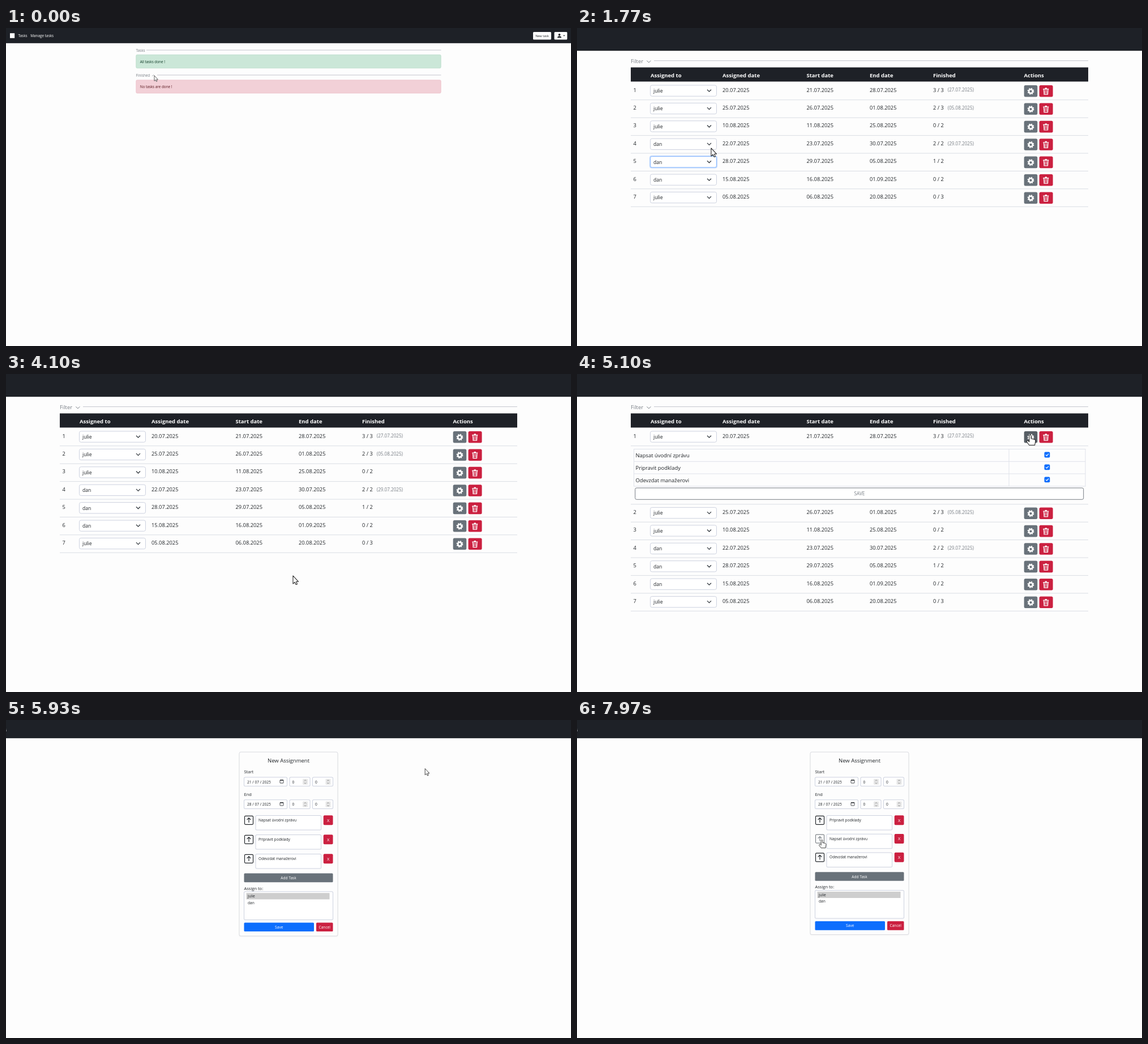
Animation of 998x561 px, one loop 8000 ms. Source, as an HTML page:

```html
<!DOCTYPE html>
<html lang="en">
<head>
<meta charset="utf-8">
<title>Task manager tour</title>
<style>
html, body { margin: 0; width: 100%; height: 100%; overflow: hidden; background: #000; }
svg { display: block; width: 998px; height: 561px; }
text { font-family: "Open Sans", "Noto Sans", sans-serif; white-space: pre; }
</style>
</head>
<body>
<svg viewBox="0 0 998 561">
  <g id="camera">
    <rect width="998" height="561" fill="#fdfdfd"/>
    <g id="page"></g>
    <g id="nav"></g>
    <g id="cursor" stroke="#222" stroke-width=".7" stroke-linejoin="round" fill="#fff">
      <path id="arrow" d="M0 0V9.4L2.1 7.5 3.5 10.4 5 9.8 3.7 6.9H6.4Z"/>
      <path id="hand" d="M-1.1 .9Q0-.6 1.1 .9V4.6L4.9 5.4Q6.5 5.9 6.2 7.6L5.4 12.3H-1.2L-4.1 8.3Q-4 6.5-2.5 7.1L-1.1 8.3Z"/>
    </g>
  </g>
</svg>
<script>
const LOOP = 8000, MID = 499;
const DARK = '#1e2127', INK = '#212529', GREY = '#69727a', RED = '#cb2040', BLUE = '#0d6efd',
  EDGE = '#cdd2df', RULE = '#c3c6cd', MUTED = '#777d84';
const $ = id => document.getElementById(id);

const rect = (x, y, w, h, fill, rx = 0, stroke = 'none', more = '') =>
  `<rect x="${x}" y="${y}" width="${w}" height="${h}" rx="${rx}" fill="${fill}" stroke="${stroke}" ${more}/>`;
const text = (x, y, s, size, fill = INK, more = '') =>
  `<text x="${x}" y="${y}" font-size="${size}" fill="${fill}" ${more}>${s}</text>`;
const centred = (x, y, s, size, fill) => text(x, y, s, size, fill, 'text-anchor="middle"');
const line = (d, stroke = INK, width = 1) =>
  `<path d="${d}" fill="none" stroke="${stroke}" stroke-width="${width}"/>`;
const view = (scale, body) =>
  `<g transform="scale(${1 / scale}) translate(${MID * (scale - 1)})">${body}</g>`;

const people = ['julie', 'dan'];
const chores = ['Napsat úvodní zprávu', 'Pripravit podklady', 'Odevzdat manažerovi'];
const heads = [[130, 'Assigned to'], [257, 'Assigned date'], [405.5, 'Start date'],
  [517, 'End date'], [629, 'Finished'], [789.5, 'Actions']];
// person, assigned, start, end, progress, finish date
const rows = [
  [0, '20.07', '21.07', '28.07', '3 / 3', '27.07'],
  [0, '25.07', '26.07', '01.08', '2 / 3', '05.08'],
  [0, '10.08', '11.08', '25.08', '0 / 2'],
  [1, '22.07', '23.07', '30.07', '2 / 2', '29.07'],
  [1, '28.07', '29.07', '05.08', '1 / 2'],
  [1, '15.08', '16.08', '01.09', '0 / 2'],
  [0, '05.08', '06.08', '20.08', '0 / 3']];

const navBar = () =>
  rect(0, 0, 998, 26.8, DARK) +
  rect(7, 9.2, 8.2, 8.6, '#fff') +
  text(21.5, 16.3, 'Tasks', 6.4, '#fff') +
  text(43.3, 16.3, 'Manage tasks', 6.4, '#fff') +
  rect(931, 7, 32, 13.5, '#fdfdfd', 1.5) +
  centred(947, 16, 'New task', 5.6, INK) +
  rect(968.5, 7, 22.8, 13.5, '#fdfdfd', 1.5) +
  `<g fill="${INK}"><circle cx="977.5" cy="11.8" r="1.9"/>
   <path d="M974 17.2Q974 14.2 977.5 14.2T981 17.2ZM984 12.7H987.6L985.8 14.6Z"/></g>`;

const tasksPage = () =>
  text(229.5, 41.6, 'Tasks', 6.4, MUTED) + line('M248 39H768.5', RULE) +
  rect(229.8, 47.2, 538.4, 23.6, '#cbe7d8', 2, '#a9d3be', 'stroke-width=".6"') +
  text(236.7, 61.8, 'All tasks done !', 6.35, '#0a3622') +
  text(229.5, 85.8, 'Finished', 6.35, MUTED) + line('M258 85L260.5 82.8 263 85', MUTED, .6) +
  line('M267 83H768.5', RULE) +
  rect(229.8, 91.8, 538.4, 23.2, '#f2d0d7', 2, '#e9b6bf', 'stroke-width=".6"') +
  text(236.7, 106.3, 'No tasks are done !', 6.35, '#58151c');

const gear = (x, y) => `<g fill="none" stroke="#fff"><circle cx="${x}" cy="${y}" r="3.4" stroke-width="2.6"/>
  <circle cx="${x}" cy="${y}" r="5" stroke-width="1.8" stroke-dasharray="2.1 1.827"/></g>`;
const bin = (x, y) => line(`M${x - 5} ${y - 4}H${x + 5}M${x - 1.6} ${y - 5.4}H${x + 1.6}`, '#fff', 1.4) +
  line(`M${x - 4} ${y - 3.5}L${x - 3.2} ${y + 5.5}H${x + 3.2}L${x + 4} ${y - 3.5}
    M${x - 1.6} ${y - 2.5}V${y + 4}M${x + 1.6} ${y - 2.5}V${y + 4}`, '#fff', 1.2);

function tableRow([who, assigned, start, end, progress, done], i, y, focus, hover) {
  const date = (x, d) => text(x, y + 112.6, d + '.2025', 9.3);
  return text(99.5, y + 112.6, i + 1, 9.3) +
    (focus ? rect(128, y + 99.5, 120, 22.5, '#c3dafe', 4) : '') +
    rect(129.5, y + 101, 117, 19.3, '#fff', 3, focus ? '#86b7fe' : EDGE) +
    text(135, y + 114, people[who], 8.6) +
    line(`M230 ${y + 108.7}l3.5 3.5 3.5-3.5`, '#343a40', 1.3) +
    date(257, assigned) + date(405.5, start) + date(517, end) +
    text(629, y + 112.6, progress, 9.3) +
    (done ? text(654.8, y + 112.4, `(${done}.2025)`, 8.1, MUTED) : '') +
    rect(789.7, y + 101, 23.6, 20.6, hover ? '#575e65' : GREY, 2.5) + gear(801.5, y + 111.7) +
    rect(816.6, y + 101, 24, 20.6, RED, 2.5) + bin(828.3, y + 111.7) +
    line(`M95 ${y + 126.8}H903`, '#dadde4');
}

const details = () =>
  rect(100.5, 132.5, 797.5, 65.5, 'none', 0, '#dfe2ea') +
  line('M100.5 154.3H898M100.5 176H898M763 132.5V198', '#dfe2ea') +
  chores.map((chore, i) => {
    const y = 142.5 + 21.9 * i;
    return text(103.5, y + 4.4, chore, 9.4) + rect(825.5, y - 4.9, 9.8, 9.8, BLUE, 2) +
      line(`M828 ${y}l1.8 1.8 3.2-3.6`, '#fff', 1.2);
  }).join('') +
  rect(102.7, 201, 792, 20.3, '#fff', 2.5, MUTED) +
  centred(MID, 214.4, 'SAVE', 8.2, MUTED) +
  line('M95 229.8H903', '#dadde4');

const tablePage = (open, focused) => view(1.5,
  text(95, 61.8, 'Filter', 9.4, MUTED) + line('M123.3 57.5l3.5 3.5 3.5-3.5', MUTED) +
  line('M136 57.7H903', RULE) + rect(95, 69.5, 808, 25, DARK) +
  heads.map(([x, s]) => text(x, 86.7, s, 9.5, '#fff', 'font-weight="700"')).join('') +
  rows.map((r, i) => tableRow(r, i, 31.4 * i + (open && i ? 103 : 0), focused && i == 4, open && !i)).join('') +
  (open ? details() : ''));

const field = (x, y, w) => rect(x, y, w, 15.7, '#fff', 2, EDGE);
const spinner = (x, y) => field(x, y, 36) + text(x + 4.5, y + 10.6, '0', 6.6) +
  rect(x + 23, y + 3, 9, 10, '#e7e7e7', 1) +
  line(`M${x + 25.7} ${y + 6.7}l1.8-1.8 1.8 1.8M${x + 25.7} ${y + 9.5}l1.8 1.8 1.8-1.8`, '#777', .8);
const dateFields = (y, label, date) =>
  text(420.5, y - 6.8, label, 7.5) + field(420.5, y, 76) + text(426, y + 10.6, date, 6.6) +
  rect(484, y + 5, 6, 5.3, 'none', .5, INK, 'stroke-width=".8"') + line(`M484 ${y + 5.2}h6`, INK, 1.3) +
  spinner(501, y) + spinner(541.5, y);
const button = (x, y, w, fill, label) =>
  rect(x, y, w, 15.6, fill, 1.5) + centred(x + w / 2, y + 10.3, label, 6.6, '#fff');

function formPage(swapped, hover) {
  const gap = swapped ? 32.8 : 34, y = 2 * (gap - 34);
  const order = swapped ? [1, 0, 2] : [0, 1, 2];
  return view(1.2,
    rect(411, 57, 176, 326 + y, '#00000008', 4) +
    rect(412, 56.5, 174, 324.5 + y, '#fdfdfd', 3, '#dcdde2') +
    centred(MID, 74.8, 'New Assignment', 9.5, INK) +
    dateFields(101, 'Start', '21 / 07 / 2025') + dateFields(140.7, 'End', '28 / 07 / 2025') +
    order.map((n, i) => {
      const top = 168.5 + gap * i, ink = hover && i == 1 ? '#7d8287' : INK;
      return rect(421.5, top + .8, 15, 15, '#fff', 1.5, ink, 'stroke-width="1.2"') +
        line(`M429 ${top + 12.5}v-8M425.6 ${top + 7.6}l3.4-3.4 3.4 3.4`, ink, 1.2) +
        rect(441, top, 115.6, 25.5, '#fff', 2, EDGE) + text(446, top + 10.3, chores[n], 6.6) +
        rect(560.7, top - .3, 16.8, 17, RED, 2) + centred(569.1, top + 11.1, 'X', 7.6, '#fff');
    }).join('') +
    button(420.5, 270.6 + y, 157, GREY, 'Add Task') +
    text(420.5, 299.6 + y, 'Assign to:', 7.5) +
    rect(420.5, 302.8 + y, 157, 49.7, '#fff', 2, EDGE) +
    rect(424.5, 305.2 + y, 147, 11.2, '#cecece') +
    text(427, 313.3 + y, people[0], 6.6) + text(427, 324.8 + y, people[1], 6.6) +
    button(420.5, 357.5 + y, 123.5, BLUE, 'Save') + button(548, 357.5 + y, 29.5, RED, 'Cancel'));
}

const between = (t, a, b) => t >= a && t < b;
function ease(t, a, b) {
  const k = Math.min(1, Math.max(0, (t - a) / (b - a)));
  return k * k * (3 - 2 * k);
}

// time, x, y of the pointer on the page
const path = [[0, 262, 84], [560, 71.5, 14.7], [880, 71.5, 14.7], [1480, 322, 157], [1600, 322, 157],
  [1740, 324.3, 141.3], [1850, 324.3, 141.3], [2450, 350, 165], [2550, 350, 165], [3250, 490, 250],
  [3430, 490, 250], [3950, 504.3, 237.3], [4250, 504.3, 237.3], [4850, 700, 71.4], [6050, 700, 71.4],
  [6900, 443.6, 175.8]];
function pointer(t) {
  let i = path.findIndex(p => p[0] > t);
  if (i < 0) return path.at(-1).slice(1);
  const [a, x, y] = path[i - 1], [b, u, v] = path[i], k = ease(t, a, b);
  return [x + (u - x) * k, y + (v - y) * k];
}

let shown = '';
function draw(t) {
  const zoomIn = ease(t, 0, 770), pan = ease(t, 870, 1670), zoomOut = ease(t, 5106, 5906);
  const scale = 1 + .5 * zoomIn - .3 * zoomOut;
  const left = 1.75 * zoomIn * (1 - pan) + MID * (1 - scale) * pan;
  $('camera').setAttribute('transform', `translate(${left}) scale(${scale})`);

  const markup = t < 620 ? tasksPage()
    : t < 5650 ? tablePage(t > 4900, between(t, 1530, 3000))
    : formPage(t > 7300, t > 6850);
  if (markup != shown) $('page').innerHTML = shown = markup;

  const hand = between(t, 500, 930) || between(t, 4800, 5650) || t > 6850;
  $('hand').style.display = hand ? '' : 'none';
  $('arrow').style.display = hand ? 'none' : '';
  $('cursor').setAttribute('transform', `translate(${pointer(t)})`);
}

$('nav').innerHTML = navBar();
const began = performance.now();
function tick() {
  draw((performance.now() - began) % LOOP);
  requestAnimationFrame(tick);
}
tick();
</script>
</body>
</html>
```
